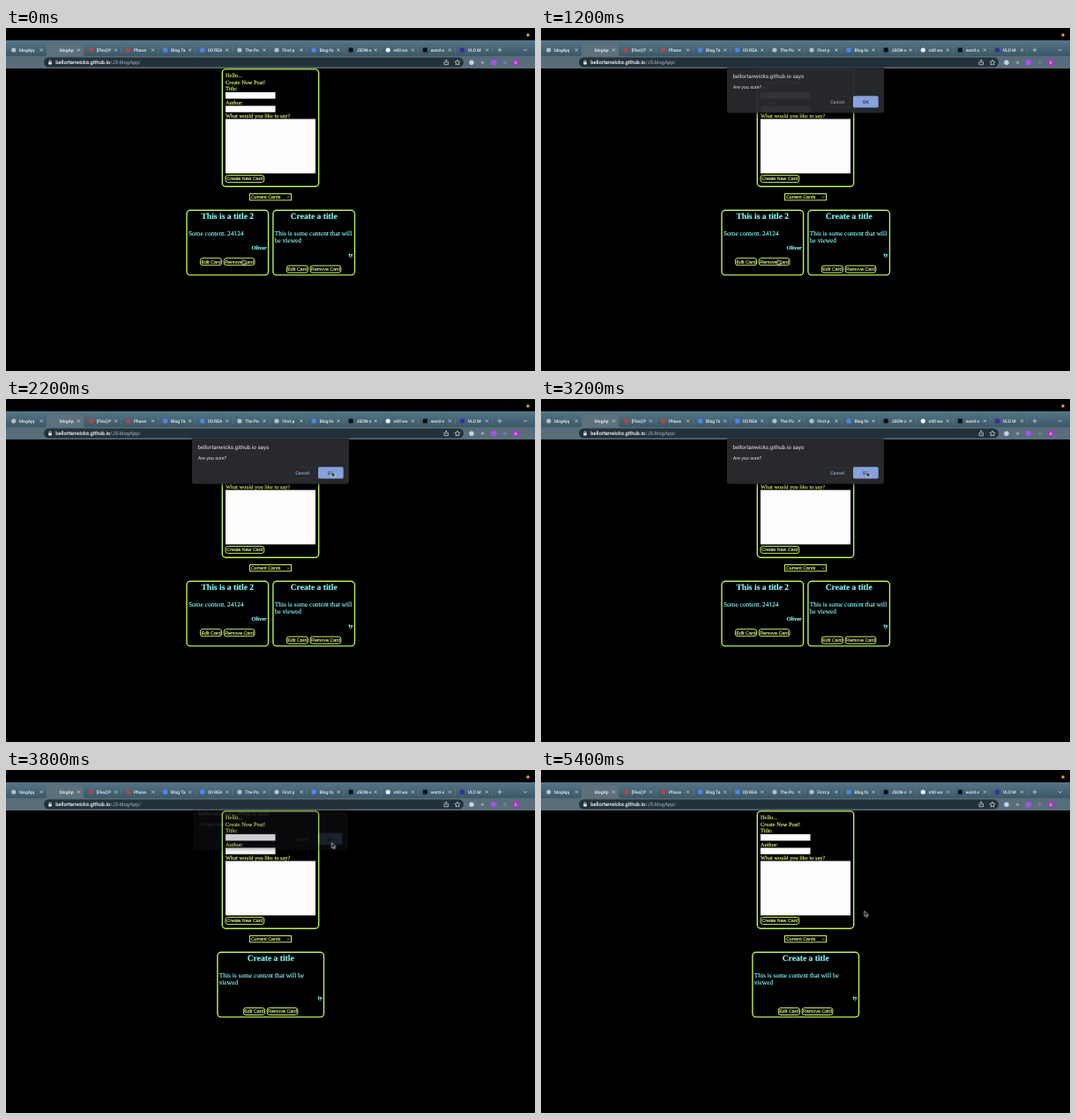
An HTML page that plays this animation: 600 by 390 pixels, repeating every 5600 ms.

```html
<!DOCTYPE html>
<html lang="en">
<head>
<meta charset="utf-8">
<title>Blog cards</title>
<style>
  html, body { margin: 0; width: 100%; height: 100%; overflow: hidden; background: #000; }
  svg { display: block; width: 600px; height: 390px; text-rendering: geometricPrecision; }

  .ui { font-family: Roboto, Inter, sans-serif; }
  .tab { font-size: 5px; font-weight: 500; fill: #eef2f4; }
  .url { font-size: 5.83px; fill: #fff; stroke: #fff; stroke-width: .1; }
  .url .dim { fill: #a3afb6; stroke: none; }
  .line { fill: none; stroke: #dfe5e8; stroke-width: .7; }

  .page { font: 6.4px "Liberation Serif", "Times New Roman", serif; }
  .page text { fill: #def86a; stroke: #def86a; stroke-width: .14; }
  .page .ctl-text { font: 5.33px "Liberation Sans", Arial, sans-serif; fill: #e6fa8c; stroke: #e6fa8c; }
  .frame { fill: #000; stroke: #b9f050; stroke-width: 1.4; }
  .field { fill: #fefcff; stroke: #9a9a9a; stroke-width: .3; }
  .ctl { fill: #000; stroke: #c8f05a; stroke-width: 1; }
  .card .head, .card .body, .card .by { fill: #84f6f8; stroke: #84f6f8; }
  .card .head { font-size: 9.6px; font-weight: 700; text-anchor: middle; }
  .card .body { font-size: 7.41px; }
  .card .by { font-weight: 700; text-anchor: end; }

  .before, .after, .dialog, .cursor, .ok, .cancel {
    animation: 5600ms step-end infinite;
  }
  .before { animation-name: before; }
  .after { animation-name: after; }
  .dialog { animation-name: dialog; transform-origin: 300px 45px; }
  .cursor { animation-name: cursor; }
  .ok { animation-name: ok; }
  .cancel { animation-name: cancel; }
  .shade { filter: drop-shadow(0 1.5px 2.5px rgba(0, 0, 0, .6)); }

  @keyframes before { 0% { opacity: 1 } 67.857%, 100% { opacity: 0 } }
  @keyframes after { 0% { opacity: 0 } 67.857%, 100% { opacity: 1 } }
  @keyframes dialog {
    0% { opacity: 0; transform: none }
    21.429% { opacity: .96; transform: none }
    23.214% { opacity: 1; transform: none }
    67.857% { opacity: .22; transform: translateY(-5.5px) scaleX(.985) }
    69.643% { opacity: .06; transform: translateY(-5.5px) scaleX(.985) }
    71.429%, 100% { opacity: 0; transform: none }
  }
  @keyframes ok {
    0% { fill: #8eaae6 }
    37.5% { fill: #8aa6e1 }
    39.286% { fill: #86a1db }
    64.286%, 100% { fill: #7d97d0 }
  }
  @keyframes cancel { 0% { fill: #989ca4 } 23.214%, 100% { fill: #8ea9e2 } }
  @keyframes cursor {
    0% { transform: translate(268.3px, 263.3px) }
    26.786% { transform: translate(277px, 250px) }
    28.571% { transform: translate(300px, 212px) }
    30.357% { transform: translate(330px, 160px) }
    32.143% { transform: translate(352px, 118px) }
    33.929% { transform: translate(366px, 90px) }
    35.714% { transform: translate(369.5px, 82.7px) }
    75% { transform: translate(377px, 83px) }
    76.786% { transform: translate(386px, 83px) }
    78.571% { transform: translate(390px, 82.3px) }
    80.357% { transform: translate(386px, 105px) }
    82.143% { transform: translate(375px, 136px) }
    83.929% { transform: translate(366.7px, 155.5px) }
    85.714%, 100% { transform: translate(366.7px, 160.3px) }
  }
</style>
</head>
<body>
<svg viewBox="0 0 600 390">
  <defs>
    <linearGradient id="strip" x2="0" y2="1">
      <stop offset="0" stop-color="#557587"/>
      <stop offset="1" stop-color="#3b5766"/>
    </linearGradient>
    <linearGradient id="bar" x2="0" y2="1">
      <stop offset="0" stop-color="#566c78"/>
      <stop offset="1" stop-color="#586f7c"/>
    </linearGradient>
  </defs>

  <rect width="600" height="390"/>
  <circle cx="592" cy="8" r="1.7" fill="#f0a03c"/>

  <g class="ui">
    <rect y="14" width="600" height="18.500" fill="url(#strip)"/>
    <rect y="32" width="600" height="14" fill="url(#bar)"/>
    <path d="M43 32.500q3 0 3-3V20q0-3 3-3h36q3 0 3 3v9.500q0 3 3 3z" fill="#5d717c"/>
    <g id="tabs"></g>
    <path class="line" d="M557.500 25h5M560 22.500v5M587 24l2 2 2-2"/>

    <rect x="43" y="33.500" width="476" height="11" rx="5.500" fill="#23323a"/>
    <rect x="48.200" y="38.500" width="3.600" height="3" rx=".4" fill="#e4e8ea"/>
    <path class="line" d="M49 38.500v-.8a1 1 0 0 1 2 0v.8"/>
    <text class="url" x="56.300" y="41.200">bellortanwicks.github.io<tspan class="dim">/JS-blogApp/</tspan></text>
    <path class="line" d="M498 38.500h-1v3.200h4.500v-3.200h-1M499.250 40v-4m-1.300 1.300 1.300-1.300 1.300 1.300"/>
    <path class="line" d="M512 36.200l.9 1.900 2.100.3-1.500 1.500.4 2.100-1.900-1-1.900 1 .4-2.100-1.500-1.500 2.100-.3z"/>
    <circle cx="528" cy="39.300" r="2.700" fill="#c3d2e2"/>
    <circle cx="540.500" cy="39.300" r="1.800" fill="#8b9fab"/>
    <circle cx="553" cy="39.300" r="3.300" fill="#a552e6"/>
    <rect x="564" y="37.400" width="3.800" height="3.800" fill="#6b808b"/>
    <circle cx="578.300" cy="39.300" r="4" fill="#a03cba"/>
    <text x="578.300" y="41" font-size="4.600" fill="#f0d8f5" text-anchor="middle">B</text>
  </g>

  <g class="page">
    <rect class="frame" x="245.300" y="46.900" width="109.400" height="133.300" rx="4"/>
    <text x="249" y="56.400">Hello...</text>
    <text x="249" y="63.600">Create New Post!</text>
    <text x="249" y="70.900">Title:</text>
    <rect class="field" x="249" y="73" width="56.500" height="7.300"/>
    <text x="249" y="86.500">Author:</text>
    <rect class="field" x="249" y="88.500" width="56.500" height="7.300"/>
    <text x="249" y="101.700">What would you like to say?</text>
    <rect class="field" x="249" y="103.500" width="102" height="61.700"/>
    <path d="M348.300 164.500l2-2m-.8 2 .8-.8" stroke="#777" stroke-width=".4"/>
    <g id="create"></g>
    <rect class="ctl" x="276.500" y="188.500" width="47" height="7.300"/>
    <text class="ctl-text" x="278" y="194">Current Cards</text>
    <path d="M318.800 191.500l1.500 1.500 1.500-1.500" fill="none" stroke="#c8f05a" stroke-width=".6"/>
    <g class="card before" id="before"></g>
    <g class="card after" id="after"></g>
  </g>

  <g class="ui dialog">
    <path class="shade" d="M211 45h178v48.500q0 3-3 3H214q-3 0-3-3z" fill="#28292d"/>
    <text x="217.500" y="57.400" font-size="6.250" fill="#e6e7ea">bellortanwicks.github.io says</text>
    <text x="217.700" y="69" font-size="5.420" fill="#e2e4e7">Are you sure?</text>
    <rect x="321.500" y="77.500" width="29" height="12.800" rx="1.500" fill="none" stroke="#34363b" stroke-width=".5"/>
    <text class="cancel" x="336.200" y="85.600" font-size="5.200" font-weight="500" text-anchor="middle">Cancel</text>
    <rect class="ok" x="354" y="77.200" width="28.700" height="13.200" rx="1.700"/>
    <text x="368.300" y="85.600" font-size="5.200" font-weight="500" fill="#25314c" text-anchor="middle">OK</text>
  </g>

  <path class="cursor" d="M0 0v6.200l1.500-1.300 1 2.300 1.100-.5-1-2.200h2z" fill="#000" stroke="#fff" stroke-width=".65"/>
</svg>

<script>
  const put = (id, html) => document.getElementById(id).innerHTML = html;

  const pill = (x, y, w, label) =>
    `<rect class="ctl" x="${x + .5}" y="${y}" width="${w - 1}" height="8" rx="2.600"/>
     <text class="ctl-text" x="${x + w / 2}" y="${y + 5.9}" text-anchor="middle">${label}</text>`;

  function card(x, w, title, lines, author, authorY, buttonY) {
    const mid = x + w / 2;
    const body = lines.map((t, i) =>
      `<text class="body" x="${x + 2.6}" y="${235.5 + i * 8.7}">${t}</text>`).join("");
    return `<rect class="frame" x="${x + .7}" y="207.200" width="${w - 1.4}" height="73.700" rx="4"/>
      <text class="head" x="${mid}" y="217.400">${title}</text>${body}
      <text class="by" x="${x + w - 2.4}" y="${authorY}">${author}</text>` +
      pill(mid - 31.4, buttonY, 25.2, "Edit Card") +
      pill(mid - 4.6, buttonY, 35.8, "Remove Card");
  }

  // label, icon colour, icon shape
  const tabs = [
    ["blogApp", "#b4c0c6", "o"], ["blogAp", "", ""], ["[Flex] P", "#b8453f", "o"],
    ["Phase", "#b8453f", "o"], ["Blog Ta", "#4a86f0", "s"], ["00 REA", "#4a86f0", "s"],
    ["The Po", "#b4c0c6", "o"], ["First p", "#b4c0c6", "o"], ["Blog fo", "#4a86f0", "s"],
    ["JSON-s", "#0c0e10", "s"], ["still wo", "#eef1f3", "o"], ["word-s", "#0c0e10", "s"],
    ["VLO M", "#3d2a9c", "s"]
  ];
  put("tabs", tabs.map(([label, color, shape], i) => {
    const x = i ? 18.6 + 42.1 * i : 15, cx = x - 6.3, end = 40.3 + 42.1 * i;
    const icon = shape === "o" ? `<circle cx="${cx}" cy="25" r="2.600" fill="${color}"/>`
      : shape === "s" ? `<rect x="${cx - 2.5}" y="22.500" width="5" height="5" rx=".5" fill="${color}"/>` : "";
    const gap = i > 1 ? `<path d="M${end + 6} 21v8" stroke="#6d838e" stroke-width=".5"/>` : "";
    return `${icon}${gap}<svg x="${x}" y="18" width="17" height="13">
      <text class="tab" y="8.700">${label}</text></svg>
      <path class="line" d="M${end - 1.5} 23.500l3 3m0-3-3 3"/>`;
  }).join(""));

  put("create", pill(248.5, 167.4, 44.8, "Create New Card"));
  put("before",
    card(204.3, 94, "This is a title 2", ["Some content. 24124"], "Oliver", 252.2, 261.7) +
    card(302.2, 94, "Create a title", ["This is some content that will", "be viewed"], "ty", 260.3, 270.2));
  put("after",
    card(239.2, 122, "Create a title", ["This is some content that will be", "viewed"], "ty", 260.8, 270.5));
</script>
</body>
</html>
```
